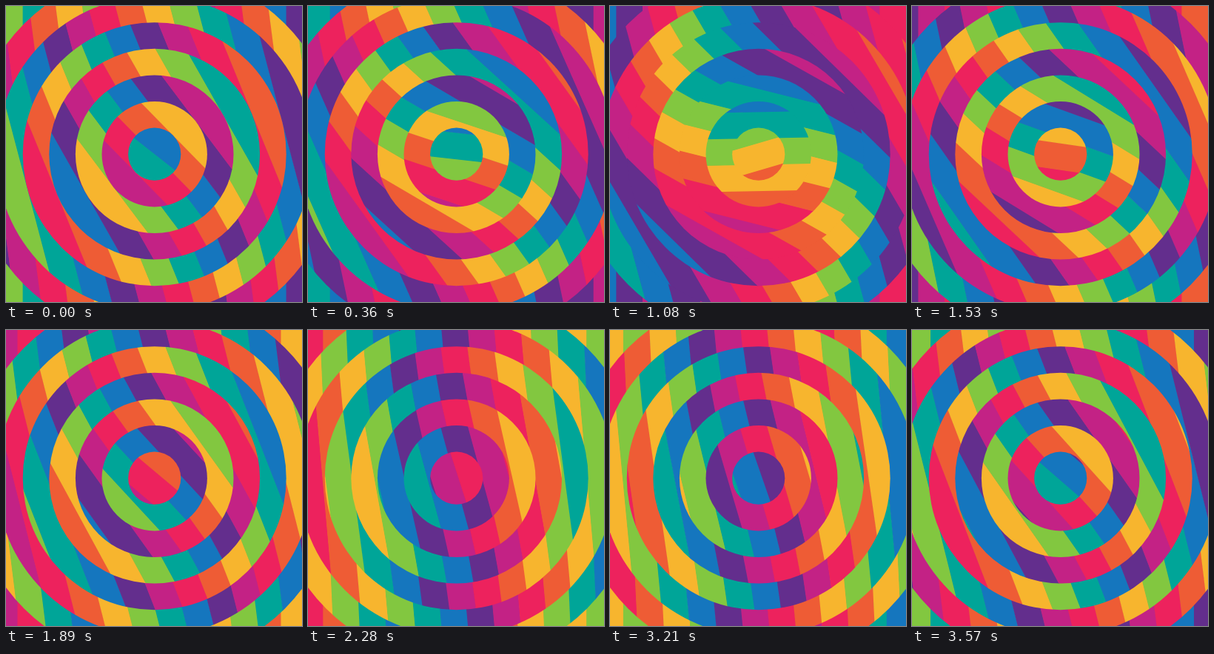
Write an HTML page with a canvas that moves like this. It is 400 by 400 pixels and loops after 3.6 s.

```html
<!DOCTYPE html>
<html>
<head>
<meta charset="utf-8">
<title>Twisting rainbow rings</title>
<style>
html, body { margin: 0; height: 100%; overflow: hidden; }
canvas { display: block; }
</style>
</head>
<body>
<canvas id="stage" width="400" height="400"></canvas>
<script>
const ctx = document.getElementById('stage').getContext('2d');
const COLORS = ['#ee5c35', '#f7b52e', '#82c740', '#00a598', '#1576be', '#632e8d', '#c32285', '#ed225d'];
const LOOP = 3600, RINGS = 8, STEP = 35.6, CX = 200.7, CY = 200.2;

// Stripes centred on the origin; `phase` is the colour position at x = 0.
function drawStripes(phase, radius) {
  const reach = radius / STEP;
  for (let i = Math.floor(phase - reach); i < phase + reach; i++) {
    ctx.fillStyle = COLORS[((i % 8) + 8) % 8];
    ctx.fillRect((i - phase) * STEP, -radius, STEP + 0.5, 2 * radius);
  }
}

function draw(now) {
  const t = (now % LOOP) / LOOP;
  const twist = (55 + 53 * Math.sin(2 * Math.PI * (t - 0.01))) * Math.PI / 180;
  for (let n = RINGS - 1; n >= 0; n--) {
    const radius = (n + 1) * STEP;
    ctx.save();
    ctx.translate(CX, CY);
    ctx.beginPath();
    ctx.arc(0, 0, radius, 0, 2 * Math.PI);
    ctx.clip();
    ctx.rotate(-twist * (1 - n / (RINGS - 1)));
    drawStripes(n % 2 ? 8 * t : 4 - 8 * t, radius + 1);
    ctx.restore();
  }
  requestAnimationFrame(draw);
}
requestAnimationFrame(draw);
</script>
</body>
</html>
```
